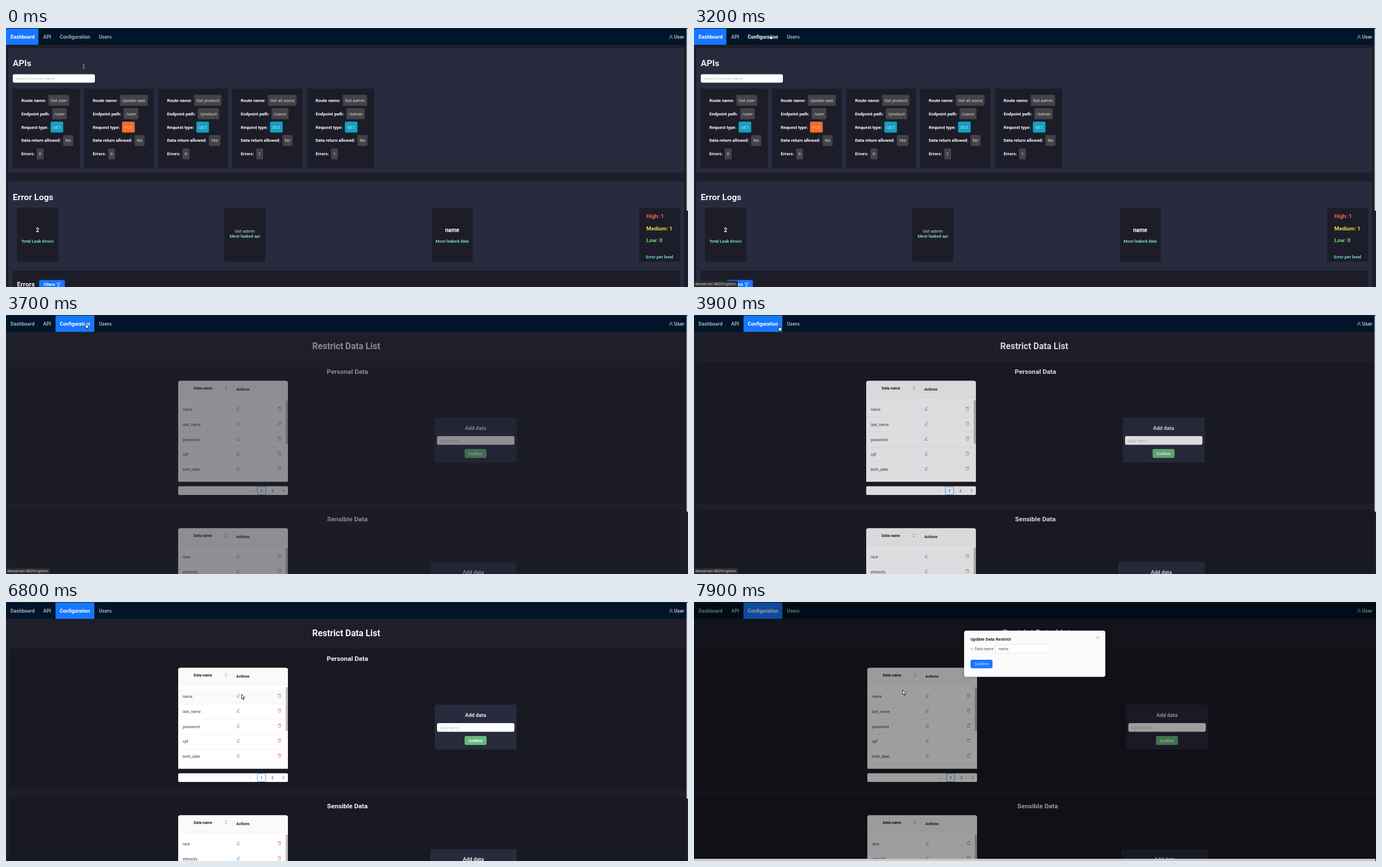
An HTML page with a canvas that plays this animation: 1212x462 px, repeating every 8 s.

```html
<!DOCTYPE html>
<html lang="en">
<head>
<meta charset="utf-8">
<title>Dashboard</title>
<style>
html, body { margin: 0; width: 100%; height: 100%; overflow: hidden; background: #1f1f2b; }
canvas { display: block; width: 1212px; height: 462px; }
</style>
</head>
<body>
<canvas id="stage" width="1212" height="462"></canvas>
<script>
const W = 1212, H = 462, LOOP = 8000, STEP = 100;
const ctx = document.getElementById('stage').getContext('2d');
const BLUE = '#1677ff', BODY = '#1f1f2b', PANEL = '#282a3d', CARD = '#1c1d28', TEAL = '#75d9c0';

// Pointer path: time, x, y
const PATH = [
  [0, 138, 69], [100, 140, 71], [300, 120, 66], [500, 100, 63], [700, 87, 73], [800, 87, 73],
  [900, 90, 72], [1200, 75, 58], [1400, 86, 39], [1600, 76, 58], [1700, 72, 69],
  [1800, 73, 68], [2200, 106, 42], [2600, 141, 14], [3100, 136, 12], [3500, 133, 10],
  [3900, 151, 19.5], [4100, 168, 38], [4400, 240, 82], [4700, 380, 125], [4900, 476, 150],
  [5200, 442, 166], [5300, 442, 166], [5400, 441, 164.5], [5500, 440, 165], [5600, 440, 165],
  [5900, 520, 215], [6100, 610, 270], [6300, 590, 190], [6500, 439, 158], [6600, 432, 160],
  [6900, 412, 167], [7400, 412, 167], [7500, 412.5, 167], [7600, 412.5, 167],
  [7700, 389.5, 163], [7900, 371, 157]
];

const clamp = v => Math.max(0, Math.min(1, v));

// Linear interpolation through rows of [time, ...values]
function track(rows, t) {
  let i = 0;
  while (i < rows.length - 2 && t > rows[i + 1][0]) i++;
  const a = rows[i], b = rows[i + 1], k = clamp((t - a[0]) / (b[0] - a[0]));
  return a.slice(1).map((v, j) => v + (b[j + 1] - v) * k);
}

function box(x, y, w, h, fill, r = 0, stroke) {
  ctx.beginPath();
  ctx.roundRect(x, y, w, h, r);
  if (fill) { ctx.fillStyle = fill; ctx.fill(); }
  if (stroke) { ctx.strokeStyle = stroke; ctx.lineWidth = 0.7; ctx.stroke(); }
}

// y is the middle of the capitals
function text(s, x, y, size, color, weight = 700, align = 'left', family = 'Roboto') {
  ctx.font = `${weight} ${size}px ${family}, sans-serif`;
  ctx.textAlign = align;
  ctx.fillStyle = color;
  ctx.fillText(s, x, y + size * 0.355);
  return ctx.measureText(s).width;
}

function line(points, color, width = 0.7, close = false, fill) {
  ctx.beginPath();
  points.forEach(([x, y]) => ctx.lineTo(x, y));
  if (close) ctx.closePath();
  if (fill) { ctx.fillStyle = fill; ctx.fill(); }
  ctx.strokeStyle = color;
  ctx.lineWidth = width;
  ctx.stroke();
}

function at(x, y, draw) {
  ctx.save();
  ctx.translate(x, y);
  draw();
  ctx.restore();
}

function nav(change, hover) {
  const muted = '#a6adb4';
  box(0, 0, W, 30, '#001529');
  box(0, 0, W, 1, '#22282d');
  ctx.globalAlpha = 1 - change;
  box(0, 1, 57.5, 29, BLUE);
  ctx.globalAlpha = change;
  box(88, 1, 69, 29, BLUE);
  ctx.globalAlpha = 1;
  text('Dashboard', 8, 15.7, 8.8, change < 0.9 ? '#fff' : muted);
  text('API', 66, 15.7, 8.8, muted);
  text('Configuration', 95.5, 15.7, 8.8, change > 0.2 || hover ? '#fff' : muted);
  text('Users', 165, 15.7, 8.8, muted);
  text('User', 1187.3, 15.7, 8.8, '#b4bac0');
  ctx.strokeStyle = '#b4bac0';
  ctx.lineWidth = 0.8;
  ctx.beginPath();
  ctx.arc(1181.8, 14.4, 1.8, 0, 7);
  ctx.stroke();
  ctx.beginPath();
  ctx.arc(1181.8, 19.5, 3, Math.PI, 0);
  ctx.stroke();
}

function routeCard(x, w, [name, path, type, data, errors]) {
  box(x, 108, w, 142, CARD, 3);
  const rows = [['Route name:', name], ['Endpoint path:', path], ['Request type:', type],
    ['Data return allowed:', data], ['Errors:', errors]];
  const colors = { GET: '#13a0c1', PUT: '#fa6b25' };
  rows.forEach(([label, value], i) => {
    const y = 129 + i * 23.9;
    const cx = x + 15.3 + text(label, x + 15.3, y, 7.78, '#fff') + 4;
    ctx.font = '400 7.78px Roboto, sans-serif';
    box(cx, y - 9.8, ctx.measureText(value).width + 8, 19.6, colors[value] || '#434348', 2);
    text(value, cx + 4, y, 7.78, '#d8d8dc', 400);
  });
}

function dashboard() {
  box(0, 30, W, H, '#1e1d29');
  box(4, 36, 1201, 222, PANEL, 3);
  text('APIs', 12, 62.7, 15.5, '#f2f2f4');
  box(12, 82.5, 146, 15, '#fff', 3);
  text('Search for route name', 17, 90, 7.1, '#c4c4c4', 400);
  routeCard(12, 119, ['Get user', '/user', 'GET', 'No', '0']);
  routeCard(139, 124, ['Update user', '/user', 'PUT', 'No', '0']);
  routeCard(271, 123, ['Get product', '/product', 'GET', 'Yes', '0']);
  routeCard(402, 125, ['Get all users', '/users', 'GET', 'No', '1']);
  routeCard(535, 119, ['Get admin', '/admin', 'GET', 'No', '1']);

  box(4, 274, 1201, 200, PANEL, 3);
  text('Error Logs', 12, 301.5, 15.5, '#f2f2f4');
  for (let i = 0; i < 4; i++) box(19.5 + i * 368.5, 320.5, 73, 96.5, CARD, 2);
  text('2', 56, 360, 10, '#fff', 700, 'center');
  text('Total Leak Errors', 56, 380, 7.6, TEAL, 700, 'center');
  text('Get admin', 424.5, 362.7, 7.78, '#d5d5da', 400, 'center');
  text('Most leaked api', 424.5, 371.7, 7.6, TEAL, 700, 'center');
  text('name', 793, 360, 10, '#fff', 700, 'center');
  text('Most leaked data', 793, 380, 7.6, TEAL, 700, 'center');
  text('High: 1', 1138, 336, 9.7, '#f4654f');
  text('Medium: 1', 1138, 357.5, 9.7, '#fbd03b');
  text('Low: 0', 1138, 379, 9.7, '#73d67a');
  text('Error per level', 1161.5, 408.7, 7.7, TEAL, 700, 'center');

  box(12, 433, 1186, 40, CARD, 3);
  text('Errors', 19.5, 457.3, 11.7, '#f2f2f4');
  box(59, 449.5, 45.5, 16, BLUE, 2);
  text('Filters', 67, 457.3, 7.1, '#fff');
  line([[90.5, 454.5], [96.5, 454.5], [94.5, 457.5], [94.5, 460.5], [92.5, 460.5], [92.5, 457.5]], '#fff', 0.7, true);
  box(1209.5, 0, 2.5, 326, '#d9d9d9', 1);
}

function editIcon(x, y) {
  line([[x - 2.6, y + 3], [x + 3, y + 3]], '#4592f8', 0.8);
  line([[x - 2, y + 1.4], [x - 1.7, y - 0.3], [x + 1.2, y - 3], [x + 2.6, y - 1.6], [x - 0.3, y + 1.2]], '#4592f8', 0.7, true);
}

function trashIcon(x, y) {
  line([[x - 3, y - 1.9], [x + 3, y - 1.9]], '#ee6a6c', 0.8);
  line([[x - 2.2, y - 1.8], [x - 1.9, y + 3], [x + 1.9, y + 3], [x + 2.2, y - 1.8]], '#ee6a6c', 0.7);
  line([[x - 1.2, y - 2], [x - 1.2, y - 3], [x + 1.2, y - 3], [x + 1.2, y - 2]], '#ee6a6c', 0.7);
}

// Origin at the table's top left corner
function dataTable(names, hover) {
  box(0, 0, 195, 180, '#fff', [4, 4, 0, 0]);
  box(0, 0, 195, 30, '#fafafa', [4, 4, 0, 0]);
  box(0, 30, 195, 0.7, '#eee');
  text('Data name', 44, 13, 6.85, '#222', 700, 'center');
  text('Actions', 103.3, 15, 6.85, '#222');
  box(97.3, 7, 0.7, 14, '#ececec');
  line([[82.8, 11.6], [84.8, 9], [86.8, 11.6]], '#b8b8b8', 0.2, true, '#b8b8b8');
  line([[82.8, 13.8], [84.8, 16.4], [86.8, 13.8]], '#b8b8b8', 0.2, true, '#b8b8b8');
  names.forEach((name, i) => {
    const y = 51.3 + i * 26.7;
    if (i === hover) box(0, y - 13.3, 191, 26.6, '#fafafa');
    box(0, y + 13.1, 191, 0.7, '#efefef');
    text(name, 8, y, 6.95, '#3c3c3c', 400);
    editIcon(106.5, y - 1.7);
    trashIcon(180, y - 1.7);
  });
  box(191, 34.5, 4, 78, '#c0c0c0');
}

function pager() {
  box(0, 0, 195, 15.5, '#fff', 2);
  line([[129.8, 5.3], [127.4, 7.8], [129.8, 10.3]], '#c4c4c4', 0.8);
  box(140.7, 0.6, 14.8, 14.3, '#fff', 2, BLUE);
  text('1', 148, 7.9, 7.1, BLUE, 700, 'center');
  text('2', 167.5, 7.9, 7.1, '#444', 400, 'center');
  line([[185.8, 5.3], [188.2, 7.8], [185.8, 10.3]], '#333', 0.8);
}

function config(modal, hover) {
  const mid = modal ? 4 : 0, left = modal ? 308 : 306, right = modal ? 6 : 0;
  const edge = modal ? W : 1209;
  box(0, 30, W, H, BODY);
  box(5, 83, edge - 5, 254, '#191923', 2);
  box(5, 347, edge - 5, 130, '#191923', 2);
  text('Restrict Data List', 604.6 + mid, 55, 15.6, '#f5f5f6', 700, 'center');
  text('Personal Data', 606.7 + mid, 100.7, 11.7, '#f5f5f6', 700, 'center');
  text('Sensible Data', 606.7 + mid, 364, 11.7, '#f5f5f6', 700, 'center');
  at(left, 117.5, () => dataTable(['name', 'last_name', 'password', 'cpf', 'birth_date'], hover));
  at(left, 305.5, pager);
  at(left, 380.5, () => dataTable(['race', 'ethnicity'], -1));

  at(right, 0, () => {
    box(762, 183, 145.5, 80, PANEL, 2);
    text('Add data', 834.5, 201.3, 9.3, '#e6e6ea', 700, 'center');
    box(766, 216, 137.5, 15.5, '#fff', 3);
    text('Data name', 771, 224, 7.1, '#c4c4c4', 400);
    box(815, 239, 39, 16, '#66b97b', 3);
    text('Confirm', 834.5, 247.2, 6.95, '#fff', 700, 'center');
    box(754, 440.5, 153.5, 40, PANEL, 2);
    text('Add data', 830.5, 458.8, 9.3, '#e6e6ea', 700, 'center');
  });
}

function dialog(scale, alpha) {
  ctx.save();
  ctx.globalAlpha = alpha;
  ctx.translate(412, 167);
  ctx.scale(scale, scale);
  ctx.translate(-412, -167);
  ctx.shadowColor = 'rgba(0,0,0,.25)';
  ctx.shadowBlur = 6;
  box(480, 51, 251, 82.5, '#fff', 4);
  ctx.shadowColor = 'transparent';
  text('Update Data Restrict', 491.5, 66, 7.75, '#222');
  line([[715.2, 61], [720, 66]], '#888', 0.8);
  line([[720, 61], [715.2, 66]], '#888', 0.8);
  text('*', 491.8, 84.3, 7, '#ff4d4f', 400);
  text('Data name', 498.8, 83.7, 6.9, '#555', 400);
  text(':', 530, 83.7, 6.9, '#555', 400);
  box(535.5, 76, 97.5, 15, '#fff', 3, '#d9d9d9');
  text('name', 541, 83.7, 7.1, '#555', 400);
  box(491.5, 103, 39, 15.2, BLUE, 3);
  text('Confirm', 511, 110.7, 6.95, '#e4efff', 400, 'center');
  ctx.restore();
}

function pointer(x, y, kind) {
  at(x, y, () => {
    if (kind === 'text') {
      line([[-1.5, -3.5], [1.5, -3.5]], '#c8c8cc', 0.7);
      line([[-1.5, 3.5], [1.5, 3.5]], '#c8c8cc', 0.7);
      line([[0, -3.5], [0, 3.5]], '#c8c8cc', 0.8);
    } else if (kind === 'hand') {
      line([[-0.8, 0.3], [0.6, 0.3], [0.8, 3], [4.6, 3.8], [5, 5], [4.2, 8.6], [0.4, 8.6],
        [-1.8, 5.4], [-1.4, 4.6], [-0.6, 5.2]], '#111', 0.9, true, '#fff');
    } else {
      line([[0, 0], [0, 8.2], [1.9, 6.6], [3.2, 9.6], [4.5, 9], [3.2, 6.1], [5.7, 5.8]], '#111', 0.9, true, '#fff');
    }
  });
}

function render(t) {
  const [x, y] = track(PATH, t);
  const onConfig = t >= 3400, modal = t >= 7700;
  const overMenu = y < 30 && x > 88 && x < 157;
  const inTable = onConfig && !modal && x > 306 && x < 497 && y > 155.5 && y < 289;
  const overEdit = inTable && Math.abs(x - 412.5) < 4;

  if (onConfig) {
    config(modal, inTable ? Math.floor((y - 155.5) / 26.7) : -1);
    // Page fades in over the body colour
    ctx.globalAlpha = 1 - clamp(0.15 + (t - 3500) / 570);
    box(0, 30, W, H, BODY);
    ctx.globalAlpha = 1;
    if (!modal) box(1209.5, 0, 2.5, 351, '#d9d9d9', 1);
  } else {
    dashboard();
  }
  nav(track([[3300, 0], [3400, 0.3], [3500, 0.7], [3600, 0.95], [3700, 1]], t)[0], overMenu);
  box(1209.5, 1, 2.5, modal ? 0 : 29, '#d9d9d9');

  if (t >= 2900 && t < 4500) {
    box(0, 451, 78, 11, '#2b2b2f', [0, 2, 0, 0]);
    text('devserver:4820/option', 2, 456.8, 6.9, '#dcdcdc', 400, 'left', '"Noto Sans"');
  }
  if (modal) {
    const [mask, scale, alpha] = track([[7700, 0.12, 0.542, 0.42], [7800, 0.27, 0.88, 0.82], [7900, 0.38, 1, 0.985]], t);
    box(0, 0, W, H, `rgba(0,0,0,${mask})`);
    dialog(scale, alpha);
    box(0, 458, 1211, 4, '#c9c9c9', 1);
  }
  const overHeading = !onConfig && y > 50 && y < 72;
  pointer(x, y, overMenu || overEdit ? 'hand' : overHeading ? 'text' : 'arrow');
}

function tick(now) {
  render(Math.floor((now % LOOP) / STEP) * STEP);
  requestAnimationFrame(tick);
}
requestAnimationFrame(tick);
</script>
</body>
</html>
```
